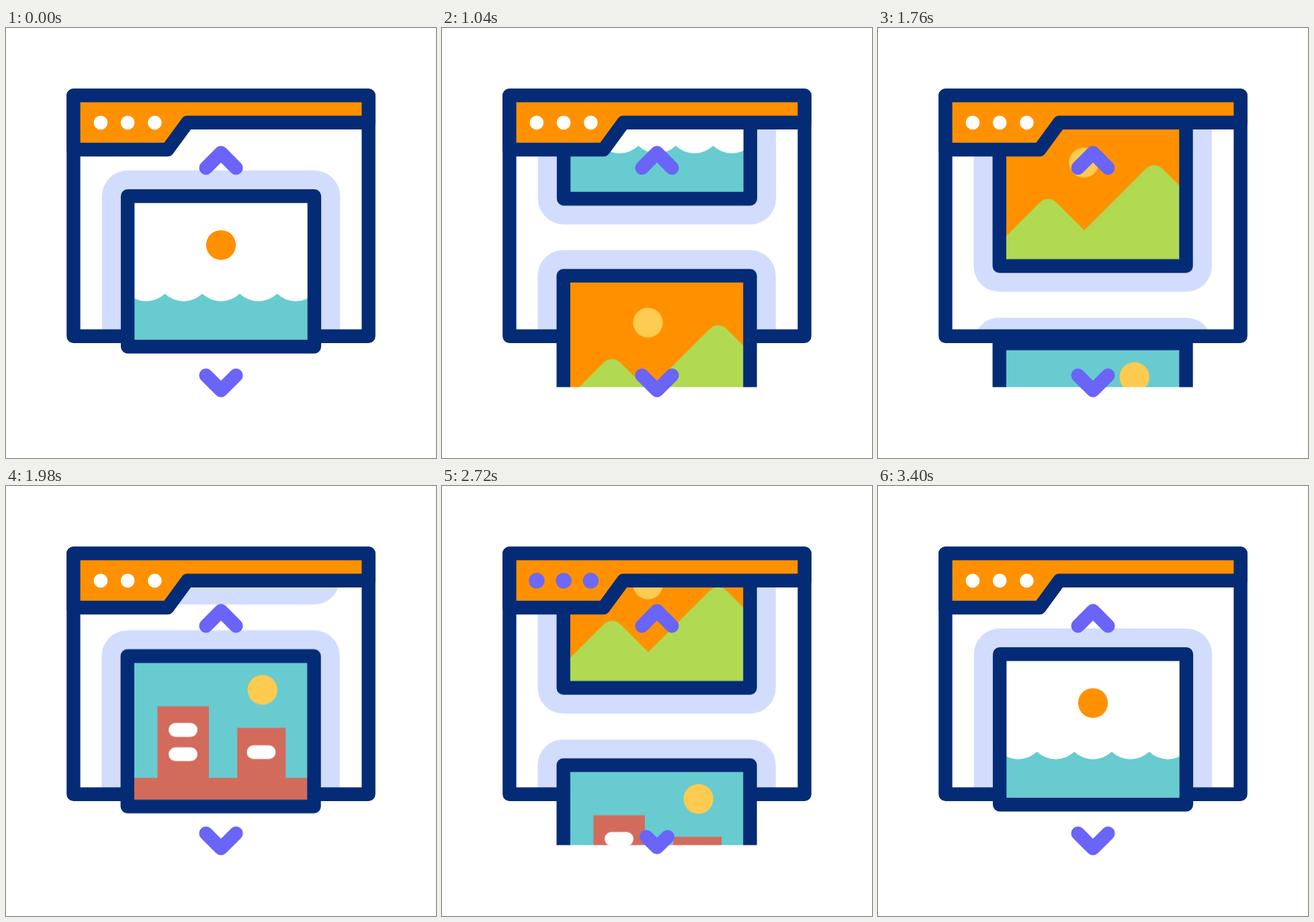
Animation, 640 px wide and 640 px high, one loop 3.6 s. Source, as an HTML page:

```html
<!DOCTYPE html>
<html lang="en">
<head>
<meta charset="utf-8">
<title>Image scroll</title>
<style>
  html, body { margin: 0; width: 100%; height: 100%; overflow: hidden; background: #fff; }
  svg { display: block; width: 640px; height: 640px; }

  .line { fill: none; stroke: #042b76; stroke-width: 20.4; stroke-linecap: round; stroke-linejoin: round; }
  .halo { fill: #d2ddfe; stroke: #d2ddfe; stroke-width: 76.6; stroke-linejoin: round; }
  .arrow { fill: none; stroke: #6a64f9; stroke-width: 20.4; stroke-linecap: round; stroke-linejoin: round; }
  .pill { stroke: #fff; stroke-width: 20.6; stroke-linecap: round; }
  .orange { fill: #ff9100; }
  .teal { fill: #67cbd0; }
  .green { fill: #b1d952; }
  .yellow { fill: #fdcb50; }
  .brick { fill: #d36b5d; }
  .white { fill: #fff; }
  .violet { fill: #6a64f9; }

  .strip, .up, .down, .active {
    animation: 3600ms cubic-bezier(.3333, 0, .6667, 1) infinite;
  }
  .strip { animation-name: scroll; }
  .up { animation-name: tap; }
  .down { animation-name: hold; }
  .active { animation-name: glow; }

  @keyframes scroll {
    0%, 22.2222% { transform: translateY(0); }
    33.3333%, 44.4444% { transform: translateY(-338px); }
    55.5556%, 66.6667% { transform: translateY(-676.8px); }
    94.4444%, 100% { transform: translateY(0); }
  }
  /* two short taps, one before each step */
  @keyframes tap {
    0%, 11.1111%, 22.2222%, 33.3333%, 44.4444%, 100% { d: path("M297.6 208.2L320 185.8L342.4 208.2"); }
    16.6667%, 38.8889% { d: path("M304.3 203L320 187.3L335.7 203"); }
  }
  /* one long press for the way back */
  @keyframes hold {
    0%, 55.5556%, 94.4444%, 100% { d: path("M297.6 517L320 539.4L342.4 517"); }
    61.1111%, 88.8889% { d: path("M304.3 522.2L320 537.9L335.7 522.2"); }
  }
  @keyframes glow {
    0%, 55.5556%, 80.5556%, 100% { opacity: 0; }
    61.1111%, 75% { opacity: 1; }
  }
</style>
</head>
<body>
<svg viewBox="0 0 640 640">
  <defs>
    <rect id="box" x="181.1" y="250.3" width="277.8" height="223.9"/>
    <path id="tab" d="M100.4 181H240.5L270 140.8H539.6"/>
    <clipPath id="page"><path d="M100.4 181H240.5L270 140.8H539.6V458.8H100.4Z"/></clipPath>
    <clipPath id="view"><path d="M100.4 181H240.5L270 140.8H539.6V534.5H100.4Z"/></clipPath>
  </defs>

  <g clip-path="url(#page)">
    <g class="strip halo">
      <use href="#box"/>
      <use href="#box" transform="translate(-.4 338.6)"/>
      <use href="#box" transform="translate(-.4 677.4)"/>
    </g>
  </g>

  <rect class="line" x="100.4" y="100.4" width="439.2" height="358.4"/>

  <g clip-path="url(#view)">
    <g class="strip">
      <g>
        <use href="#box" class="white"/>
        <circle class="orange" cx="320" cy="323" r="22.1"/>
        <path class="teal" d="M180.8 395.5a40.3 40.3 0 0 0 55.7 0a40.3 40.3 0 0 0 55.7 0a40.3 40.3 0 0 0 55.7 0a40.3 40.3 0 0 0 55.7 0a40.3 40.3 0 0 0 55.7 0V474H180.8Z"/>
        <use href="#box" class="line"/>
      </g>
      <g transform="translate(-.4 338.6)">
        <use href="#box" class="orange"/>
        <circle class="yellow" cx="306.9" cy="320.1" r="22.2"/>
        <path class="green" d="M181 440L241.1 379.6a17.7 17.7 0 0 1 25 0L307.4 420.9L398.9 329.4a17.7 17.7 0 0 1 25 0L459 364.5V474H181Z"/>
        <use href="#box" class="line"/>
      </g>
      <g transform="translate(-.4 677.4)">
        <use href="#box" class="teal"/>
        <circle class="yellow" cx="382.1" cy="300.6" r="22.2"/>
        <path class="brick" d="M181 431.5H225.8V325H302.4V431.5H344.6V357H416.6V431.5H459V474H181Z"/>
        <path class="pill" d="M252.7 360.2h22.4M252.7 396.3h22.4M369.1 393.4h22.4"/>
        <use href="#box" class="line"/>
      </g>
    </g>
  </g>

  <path class="orange" d="M100.4 100.4H539.6V140.8H270L240.5 181H100.4Z"/>
  <use href="#tab" class="line"/>
  <path class="line" d="M100.4 181V100.4H539.6V140.8"/>
  <g class="white">
    <circle cx="140.9" cy="140.9" r="10.3"/>
    <circle cx="181.1" cy="140.9" r="10.3"/>
    <circle cx="221.4" cy="140.9" r="10.3"/>
  </g>
  <g class="violet active">
    <circle cx="140.9" cy="140.9" r="11.7"/>
    <circle cx="181.1" cy="140.9" r="11.7"/>
    <circle cx="221.4" cy="140.9" r="11.7"/>
  </g>

  <path class="arrow up" d="M297.6 208.2L320 185.8L342.4 208.2"/>
  <path class="arrow down" d="M297.6 517L320 539.4L342.4 517"/>
</svg>
</body>
</html>
```
